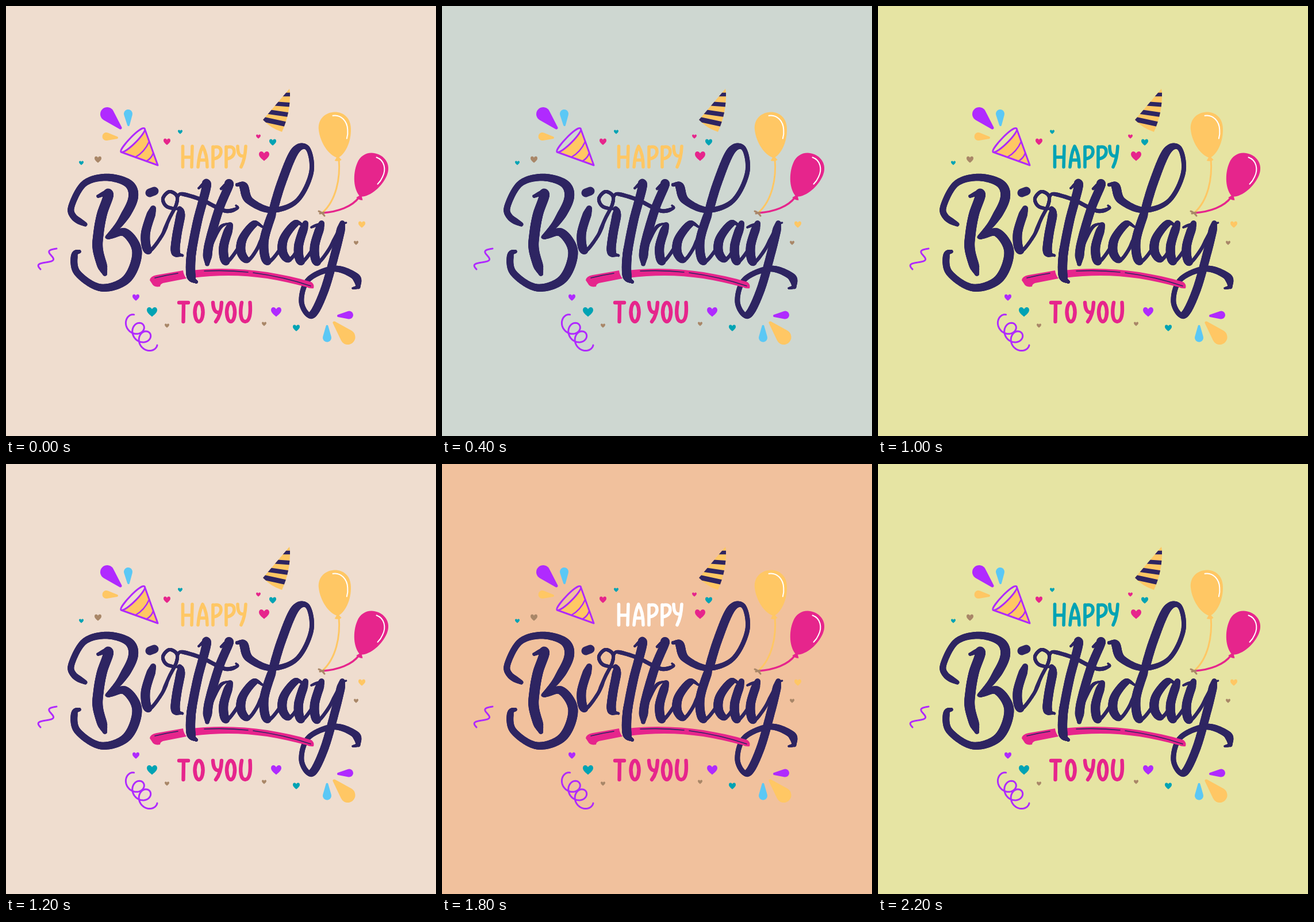
Animation of 748 by 748 pixels, one loop 2.4 s. Source, as an HTML page with a canvas:

```html
<!DOCTYPE html>
<html lang="en">
<head>
<meta charset="utf-8">
<title>Happy Birthday to You</title>
<style>
html, body { margin: 0; width: 100%; height: 100%; overflow: hidden; }
canvas { display: block; width: 748px; height: 748px; }
</style>
</head>
<body>
<canvas id="stage" width="748" height="748" role="img" aria-label="Happy Birthday to you"></canvas>
<script>
const ctx = document.getElementById('stage').getContext('2d');
const NAVY = '#2e2562', PURPLE = '#b02aff', BLUE = '#5bc8f5', YELLOW = '#ffc764',
  PINK = '#e6258c', TEAL = '#00a3b4', TAUPE = '#a98768', WHITE = '#ffffff';

// Background and "HAPPY" colour of each step
const STEP = 200;
const looks = [
  ['#efddcf', YELLOW], ['#dfdad0', YELLOW], ['#ced7d1', YELLOW],
  ['#f1c19d', WHITE], ['#c4d1be', WHITE], ['#e6e4a3', TEAL]
];

const parse = s => s.split(' ').map(p => p.split(',').map(Number));

function fill(color, d) {
  ctx.fillStyle = color;
  ctx.fill(new Path2D(d));
}

function line(color, width, d) {
  ctx.strokeStyle = color;
  ctx.lineWidth = width;
  ctx.stroke(new Path2D(d));
}

// Draws f(0..1) -> [x, y]
function plot(color, width, f, n = 120) {
  ctx.strokeStyle = color;
  ctx.lineWidth = width;
  ctx.beginPath();
  for (let i = 0; i <= n; i++) ctx.lineTo(...f(i / n));
  ctx.stroke();
}

// Dense Catmull-Rom curve through a few points
function trace(pts, n = 14) {
  const at = i => pts[Math.max(0, Math.min(pts.length - 1, i))];
  const out = [pts[0]];
  for (let i = 0; i < pts.length - 1; i++) {
    const [a, b, c, d] = [-1, 0, 1, 2].map(k => at(i + k));
    for (let k = 1; k <= n; k++) {
      const t = k / n;
      out.push([0, 1].map(j => b[j] + 0.5 * t * (c[j] - a[j] +
        t * (2 * a[j] - 5 * b[j] + 4 * c[j] - d[j] + t * (3 * (b[j] - c[j]) + d[j] - a[j])))));
    }
  }
  return out;
}

// Brush pen: thick going down, thin going up, tapered at both ends
function ink(points, thin = 6, thick = 16, tail = 14) {
  const path = trace(typeof points === 'string' ? parse(points) : points);
  const step = path.map((p, i) => i ? Math.hypot(p[0] - path[i - 1][0], p[1] - path[i - 1][1]) : 0);
  const total = step.reduce((a, b) => a + b);
  ctx.strokeStyle = NAVY;
  for (let i = 1, run = 0; i < path.length; i++) {
    run += step[i];
    const down = (path[i][1] - path[i - 1][1]) / (step[i] || 1);
    const press = thin + (thick - thin) * ((1 + down) / 2) ** 2;
    const taper = Math.min(1, 0.6 + 0.4 * run / 14, 0.45 + 0.55 * (total - run) / tail);
    ctx.lineWidth = press * taper;
    ctx.beginPath();
    ctx.moveTo(...path[i - 1]);
    ctx.lineTo(...path[i]);
    ctx.stroke();
  }
}

const hairline = (points, width = 6) => ink(points, width, width);

// Slanted downstroke that turns into a rising exit stroke
function stem(x, top, base) {
  const h = base - top;
  ink([[0, 0], [-0.18, 0.6], [-0.1, 1], [0.2, 0.65], [0.38, 0.25]]
    .map(([u, v]) => [x + u * h, top + v * h]));
}

// Left half of "d" and "a"
function bowl(x, y) {
  const pts = parse('37,5 23,0 3,25 0,49 12,63 28,43 38,17');
  ink(pts.map(p => [p[0] + x, p[1] + y]));
}

function birthday() {
  // B
  ink('138,380 118,367 114,348 136,309 175,298 213,309 221,335 201,374 176,402', 11, 17, 50);
  ink('178,402 207,394 228,428 210,475 165,490 124,464 119,433 128,427', 12, 17);
  ink('160,331 178,327 167,362 161,395 160,425 172,466', 8, 18);
  // i and the loop leading into r
  ctx.lineWidth = 15;
  line(NAVY, 15, 'M250,325 L258,322');
  stem(256, 352, 426);
  hairline('271,400 284,370 296,346 297,330 284,323 273,335 280,349 303,354');
  ink('302,353 304,362 297,400 295,428 307,434');
  // t
  hairline('299,332 306,327 340,337 380,356 402,352 400,347', 7);
  ink('335,317 349,311 333,375 322,435 322,470 331,480');
  // h
  ink('374,318 388,310 370,355 353,415 350,449', 7);
  hairline('384,311 393,308');
  hairline('353,428 362,405 374,384 388,378');
  stem(390, 381, 445);
  // d
  bowl(409, 379);
  ink('402,311 413,313 423,338 462,355 506,339 531,290 525,248 503,252 479,308 462,365', 8, 16);
  stem(465, 355, 445);
  // a
  bowl(481, 378);
  stem(521, 378, 445);
  // y
  hairline('531,385 547,378');
  stem(549, 378, 446);
  ink('585,378 573,428 553,497 531,538 514,515 526,476 570,457 607,470 613,489', 9, 15);
  hairline('584,379 592,377');
  hairline('613,489 603,491', 8);
}

function underline() {
  fill(PINK, 'M250,477 Q251,470 262,468 L308,460 Q309,468 314,474 L273,482 Q268,484 268,488 Q257,490 254,483Z');
  fill(PINK, 'M322,460 C395,452 465,461 531,480 Q537,484 535,491 Q529,492 523,489 C455,470 395,464 324,473Z');
  line(NAVY, 1.6, 'M259,473 Q279,468 299,465 M345,461 Q384,459 421,463 M430,464 Q483,471 530,487');
  // the t passes in front
  ink('326,410 322,435 322,470 331,480');
}

function greeting(color) {
  const p = 'V280 m0,-34 q14,-4 14,8 q-1,10 -13,12';
  line(color, 5.6, 'M307.5,244 V280 M324,244 L323,280 M308,263 H323');
  line(color, 5.6, 'M334,280 Q336,256 342,244 Q350,258 350,280 M336,268 H349');
  line(color, 5.6, 'M360,245 ' + p + ' M383,245 ' + p);
  line(color, 5.6, 'M403,244 Q403,262 412,261 M417,244 Q416,266 409,280');

  const o = 'a7,16.5 0 1 0 .1,0';
  line(PINK, 6.4, 'M301,516 H317 M309,516 L308.5,549 M335.5,516 ' + o + ' M391,516 ' + o);
  line(PINK, 6.4, 'M360,516 Q361,534 370,533 M375,516 Q374,538 365,549');
  line(PINK, 6.4, 'M410,516 C406,536 409,549 416,549 C424,549 426,535 424.5,516');
}

function balloon(color, x, y, deg) {
  ctx.save();
  ctx.translate(x, y);
  ctx.rotate(deg * Math.PI / 180);
  fill(color, 'M0,41 C-16,35 -28,10 -28,-11 C-28,-28 -16,-39 0,-39 C16,-39 28,-28 28,-11 C28,10 16,35 0,41Z');
  fill(color, 'M0,37 L-6,45 Q0,48 6,45Z');
  line(WHITE, 2, 'M-1,-33 C14,-34 23,-20 22,-6 Q22,2 19,9');
  ctx.restore();
}

function balloons() {
  line(YELLOW, 3, 'M579,266 C582,300 574,338 551,359');
  line(PINK, 3.5, 'M614,333 C602,349 578,358 550,360');
  line(TAUPE, 3, 'M544,357 Q550,359 554,365 M546,361 L553,359');
  balloon(YELLOW, 573, 223.5, -6);
  balloon(PINK, 632.5, 294, 23);
}

function hat() {
  const shape = 'M493,144 L447,198 Q461,213 480,219 Q495,186 494,150Z';
  fill(YELLOW, shape);
  ctx.save();
  ctx.clip(new Path2D(shape));
  for (let i = 0; i < 4; i++) {
    const y = 154 + 16 * i, dy = 2.2 * i;
    line(NAVY, 6.5 + i * 0.8, `M440,${y - dy} L500,${y + dy}`);
  }
  ctx.restore();
}

function popper(bg) {
  const mouth = 'M241,213 C247,218 208,258 200,254 C196,249 234,208 241,213Z';
  fill(YELLOW, 'M241,213 L264,278 L200,254Z');
  fill(bg, mouth);
  line(PURPLE, 3, mouth + ' M241,213 L264,277 L200,254');
  line(PURPLE, 2.5, 'M249,236 Q241,254 225,263 M256,256 Q253,265 244,270');
}

// Teardrop: a round head narrowing to a small tip
function drop(color, x, y, r, tx, ty, tip = 2) {
  ctx.fillStyle = color;
  const a = Math.atan2(ty - y, tx - x);
  const b = Math.acos((r - tip) / Math.hypot(tx - x, ty - y));
  ctx.beginPath();
  ctx.arc(x, y, r, a + b, a - b);
  ctx.arc(tx, ty, tip, a - b, a + b);
  ctx.fill();
}

function hearts(color, list) {
  for (const [x, y, r] of parse(list)) {
    ctx.save();
    ctx.translate(x, y);
    ctx.scale(r, r);
    fill(color, 'M0,.95 C-.4,.6 -1,.2 -1,-.35 C-1,-1 -.25,-1.1 0,-.5 C.25,-1.1 1,-1 1,-.35 C1,.2 .4,.6 0,.95Z');
    ctx.restore();
  }
}

function confetti() {
  drop(PURPLE, 176, 188, 12, 199, 212, 2.5);
  drop(BLUE, 212.5, 187.5, 7.5, 213, 207);
  drop(YELLOW, 174.5, 227, 7, 193, 229);
  drop(PURPLE, 597, 537.5, 7, 578, 539);
  drop(BLUE, 558.5, 577, 7.5, 558.5, 557);
  drop(YELLOW, 594.5, 576, 13, 571, 551, 2.5);

  // wave and drifting coil
  plot(PURPLE, 3, t => {
    const w = 8 * Math.sin(3 * Math.PI * t);
    return [88 - 28 * t - w, 422 + 36 * t - w * 0.25];
  });
  plot(PURPLE, 3, t => {
    const a = 1.2 + (6 * Math.PI - 1.2) * t;
    return [218 + 32 * t + 13 * Math.cos(a), 549 + 41 * t - 13 * Math.sin(a)];
  });

  hearts(PINK, '280,236,6 439,227,4 449,261,9');
  hearts(TEAL, '303,219,4 131,273,4 464,237,6 254,532,9 505,560,6');
  hearts(TAUPE, '160,267,6 609,412,4 280,556,4 449,553,4');
  hearts(PURPLE, '226,507,6 470,532,9');
  hearts(YELLOW, '619,380,6');
}

function draw([bg, accent]) {
  ctx.fillStyle = bg;
  ctx.fillRect(0, 0, 748, 748);
  ctx.lineCap = ctx.lineJoin = 'round';
  confetti();
  popper(bg);
  hat();
  balloons();
  birthday();
  underline();
  greeting(accent);
}

let shown = -1;
function tick(now) {
  const step = Math.floor(now / STEP) % looks.length;
  if (step !== shown) draw(looks[shown = step]);
  requestAnimationFrame(tick);
}
tick(performance.now());
</script>
</body>
</html>
```
